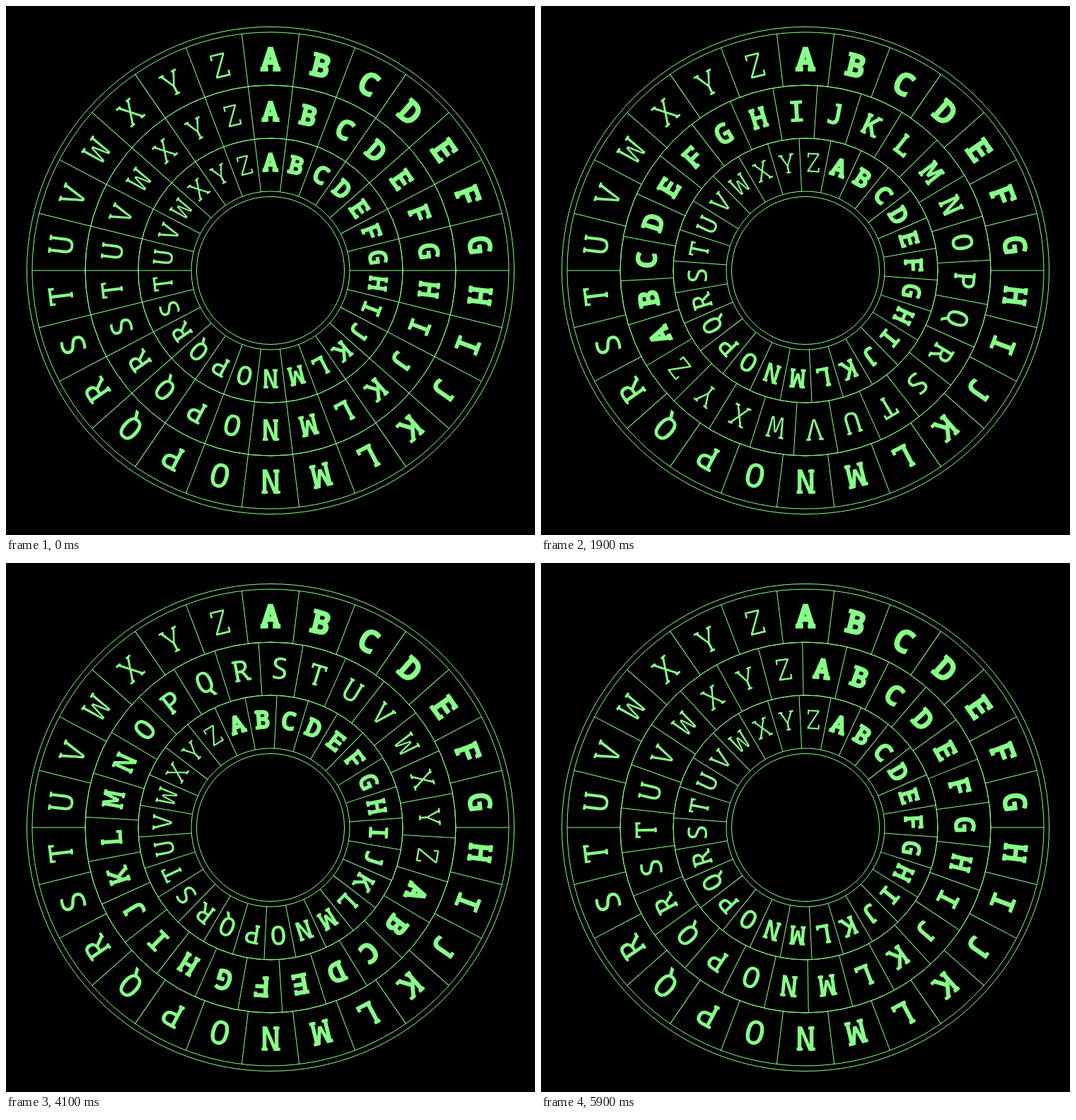
Write an HTML page that moves like this. It is 748 px wide and 748 px high and loops after 6000 ms.

```html
<!DOCTYPE html>
<html lang="en">
<head>
<meta charset="utf-8">
<title>Cipher wheel</title>
<style>
  html, body { margin: 0; width: 100%; height: 100%; overflow: hidden; background: #000; }
  svg { display: block; width: 100%; height: 100%; }
  text { font-family: "Noto Sans Mono", "DejaVu Sans Mono", monospace; font-weight: 400; text-anchor: middle; }
</style>
</head>
<body>
<svg viewBox="0 0 748 748"><g id="wheel" transform="translate(374 374)"></g></svg>
<script>
const GREEN = "#88ff88", CELLS = 26, STEP = 360 / CELLS;
const CAP = 34; // cap height before a ring's own scale
const LOOP = 6000, TICK = 100;

// Slab serifs: f = foot, c = cap, d = tick down from the cap, u = tick up from the baseline.
// Each is followed by its x on a cell 60 units wide.
const SERIFS = {
  A: "f9 f51", B: "c10 f10", D: "c10 f10", E: "c12 f12 d49 u50",
  F: "f16 c14 d51", H: "c12 f12 c48 f48", J: "c38", K: "c12 f12 c49 f51",
  L: "c16 f16 u51", M: "c9 f10 c51 f50", N: "c9 f12 c48", P: "c11 f14",
  R: "c11 f13 f52", T: "f30 d7 d53", U: "c11 c49", V: "c9 c51",
  W: "c8 c52", X: "c11 c49 f10 f50", Y: "c10 c50 f30", Z: "d10 u51"
};

// speed is in degrees per second
const RINGS = [
  { inner: 262, outer: 337, mid: 298.5, scale: 1, speed: 0 },
  { inner: 187, outer: 262, mid: 225.5, scale: 30 / 34, speed: -60 },
  { inner: 112, outer: 187, mid: 153, scale: 27 / 34, speed: -180 }
];

const wheel = document.getElementById("wheel");

function add(parent, tag, attrs) {
  const node = document.createElementNS("http://www.w3.org/2000/svg", tag);
  for (const key in attrs) node.setAttribute(key, attrs[key]);
  parent.appendChild(node);
  return node;
}

function addCircle(r) {
  add(wheel, "circle", { r, fill: "none", stroke: GREEN, "stroke-width": 1 });
}

function serifPath(char, size, grow, slab) {
  const top = -CAP / 2, bottom = CAP / 2;
  const half = 0.08 * size + Math.max(grow, 0);
  const tick = 0.17 * size + Math.max(grow, 0);
  return (SERIFS[char] || "").split(" ").filter(Boolean).map(item => {
    const x = (item.slice(1) - 30) * size / 100;
    switch (item[0]) {
      case "f": return `M${x - half} ${bottom - slab / 2}h${2 * half}`;
      case "c": return `M${x - half} ${top + slab / 2}h${2 * half}`;
      case "d": return `M${x} ${top}v${tick}`;
      default: return `M${x} ${bottom}v${-tick}`;
    }
  }).join("");
}

// Weight falls from heavy A to light Z; the outline thickens or thins the glyph.
function addLetter(parent, i, ring) {
  const char = String.fromCharCode(65 + i);
  const weight = 8 - 0.195 * i;
  const size = (CAP - weight) / 0.626;
  const grow = (weight - 0.088 * size) / 2;
  const slab = weight * 0.8;
  const cell = add(parent, "g", {
    transform: `rotate(${i * STEP}) translate(0 ${-ring.mid}) scale(${ring.scale})`
  });
  add(cell, "text", {
    y: CAP / 2 - grow, "font-size": size, fill: GREEN,
    stroke: grow > 0 ? GREEN : "#000", "stroke-width": Math.abs(2 * grow),
    "stroke-miterlimit": 2
  }).textContent = char;
  const d = serifPath(char, size, grow, slab);
  if (d) add(cell, "path", { d, fill: "none", stroke: GREEN, "stroke-width": slab });
}

function buildRing(ring) {
  ring.node = add(wheel, "g", {});
  for (let i = 0; i < CELLS; i++) {
    add(ring.node, "line", {
      y1: -ring.inner, y2: -ring.outer, stroke: GREEN, "stroke-width": 1,
      transform: `rotate(${(i + 0.5) * STEP})`
    });
    addLetter(ring.node, i, ring);
  }
  addCircle(ring.inner);
  addCircle(ring.outer);
}

RINGS.forEach(buildRing);
addCircle(344.5);
addCircle(104.5);

function render(ms) {
  const t = Math.floor((ms % LOOP + 2) / TICK) * TICK / 1000;
  for (const ring of RINGS)
    if (ring.speed) ring.node.setAttribute("transform", `rotate(${ring.speed * t})`);
}

function frame() {
  render(performance.now());
  requestAnimationFrame(frame);
}
frame();
</script>
</body>
</html>
```
